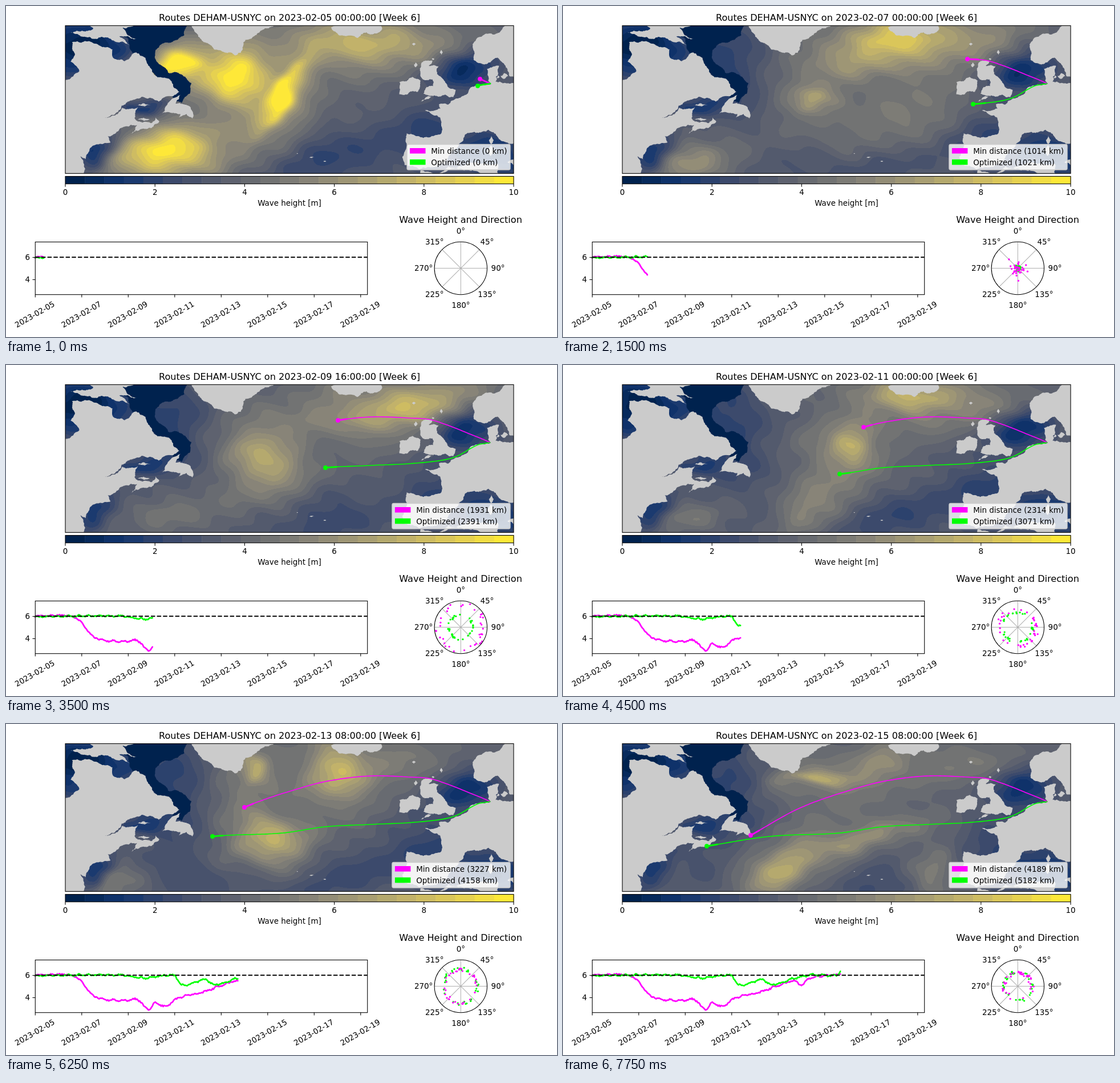
Write an HTML page with a canvas that moves like this. It is 966x580 px and loops after 8 s.

```html
<!DOCTYPE html>
<html lang="en">
<head>
<meta charset="utf-8">
<title>Routes</title>
<style>
html, body { margin: 0; width: 100%; height: 100%; overflow: hidden; background: #fff; }
canvas, svg { position: absolute; display: block; }
canvas { left: 104px; top: 34px; }
svg { left: 0; top: 0; font-family: "DejaVu Sans", sans-serif; font-size: 13.42px; }
</style>
</head>
<body>
<canvas id="sea" width="786" height="259"></canvas>
<svg id="stage" width="966" height="580" viewBox="0 0 966 580"></svg>
<script>
const start = performance.now();
const MAP = { x: 104, y: 34, w: 786, h: 259 };
const PINK = '#ff00ff', LIME = '#00ff00', LAND = '#cbcbcb';
const svg = document.getElementById('stage');

function add(tag, attrs, parent = svg, text) {
  const el = document.createElementNS('http://www.w3.org/2000/svg', tag);
  for (const k in attrs) el.setAttribute(k, attrs[k]);
  if (text !== undefined) el.textContent = text;
  parent.appendChild(el);
  return el;
}
const label = (x, y, s, anchor = 'middle', more = {}) =>
  add('text', { x, y, 'text-anchor': anchor, ...more }, svg, s);
const line = (x1, y1, x2, y2, stroke = '#000', more = {}) =>
  add('line', { x1, y1, x2, y2, stroke, 'stroke-width': 1.07, ...more });
const frame = (x, y, width, height) =>
  add('rect', { x, y, width, height, fill: 'none', stroke: '#000', 'stroke-width': 1.07 });
const curveLine = (stroke, width, parent) => add('polyline', {
  fill: 'none', stroke, 'stroke-width': width, 'stroke-linejoin': 'round', 'stroke-linecap': 'round'
}, parent);

function random(seed) {
  return () => {
    seed = (seed + 0x6D2B79F5) | 0;
    let t = Math.imul(seed ^ (seed >>> 15), 1 | seed);
    t = (t + Math.imul(t ^ (t >>> 7), 61 | t)) ^ t;
    return ((t ^ (t >>> 14)) >>> 0) / 4294967296;
  };
}

// Smooth curve through rows [t, a, b, ...], reading column c
function at(rows, t, c) {
  const n = rows.length - 1;
  if (t <= rows[0][0]) return rows[0][c];
  if (t >= rows[n][0]) return rows[n][c];
  let i = 0;
  while (rows[i + 1][0] < t) i++;
  const slope = k => {
    const a = rows[Math.max(k - 1, 0)], b = rows[Math.min(k + 1, n)];
    return (b[c] - a[c]) / (b[0] - a[0]);
  };
  const p = rows[i], q = rows[i + 1], d = q[0] - p[0], s = (t - p[0]) / d;
  const s2 = s * s, s3 = s2 * s;
  return p[c] * (2 * s3 - 3 * s2 + 1) + q[c] * (3 * s2 - 2 * s3) +
    d * (slope(i) * (s3 - 2 * s2 + s) + slope(i + 1) * (s3 - s2));
}

// ---- colours ----
const BANDS = 23;
const cividis = ['00224e', '123570', '3b496c', '575d6d', '707173', '8a8678', 'a59c74', 'c3b369', 'e1cc55', 'fee838']
  .map(h => [0, 2, 4].map(i => parseInt(h.slice(i, i + 2), 16)));
const palette = Array.from({ length: BANDS }, (_, i) => {
  const p = i / (BANDS - 1) * 9, k = Math.min(8, Math.floor(p));
  return cividis[k].map((v, c) => Math.round(v + (cividis[k + 1][c] - v) * (p - k)));
});

// ---- waves: areas are [x, y, rx, ry, degrees, height] ----
const BASE = 3.5;
const climate = [[290, 130, 70, 110, 0, 1.9], [310, 255, 110, 45, 0, 2.6], [700, 70, 120, 45, 0, 4.8],
  [560, 270, 170, 42, -14, 2.1], [750, 225, 70, 60, 0, 1.9]];
const sheltered = [[130, 70, 90, 50, 0, 0], [160, 258, 48, 20, -45, 1.4], [805, 114, 58, 36, 0, .9],
  [855, 262, 65, 36, 0, .7], [235, 175, 45, 14, 0, 1.5]];
// storms by the hour of their peak
const storms = Object.entries({
  0: [[300, 102, 50, 24, 0, 10.6], [405, 125, 52, 42, 25, 10.2], [485, 152, 72, 17, -57, 10.6],
    [620, 66, 120, 30, 0, 7.6], [285, 255, 82, 36, -8, 9.9]],
  48: [[580, 60, 95, 30, -10, 8.7], [440, 165, 36, 18, -20, 7], [590, 190, 110, 40, -20, 4.9], [225, 272, 45, 24, -10, 6]],
  80: [[535, 98, 110, 22, 0, 9.4], [745, 62, 115, 26, -20, 9.9], [322, 250, 60, 35, -20, 6.6], [650, 225, 60, 35, -20, 5]],
  112: [[450, 168, 48, 45, 15, 7.2], [705, 75, 85, 26, -5, 7.9], [280, 262, 50, 20, 0, 4.7]],
  144: [[507, 140, 30, 34, 0, 7.6], [610, 55, 75, 22, 0, 7.5], [445, 235, 75, 30, -45, 5.6], [220, 265, 50, 18, 0, 4.7]],
  200: [[580, 85, 45, 42, 0, 7.8], [460, 200, 55, 34, 15, 7.5], [432, 85, 22, 26, 10, 7.2], [175, 272, 42, 18, -15, 5.4]],
  248: [[450, 95, 60, 10, 3, 7.3], [545, 75, 55, 25, -20, 6], [390, 250, 65, 28, -30, 7.4],
    [500, 205, 110, 18, -16, 6], [650, 258, 30, 40, 20, 5]]
}).flatMap(([peak, list]) => list.map(area => ({ peak: +peak, area })));

const CELL = 3, GW = 264, GH = 89, LIFE = 24;
const sea = new Float32Array(GW * GH);

// Draws the field towards an area's height
function pull([cx, cy, rx, ry, deg, height], weight = 1) {
  const a = deg * Math.PI / 180, c = Math.cos(a), s = Math.sin(a);
  for (let j = 0, p = 0; j < GH; j++)
    for (let i = 0; i < GW; i++, p++) {
      const x = MAP.x + i * CELL, y = MAP.y + j * CELL;
      const dx = x - cx + 6 * Math.sin(y / 17) + 4 * Math.sin((x + y) / 12);
      const dy = y - cy + 4 * Math.sin(x / 21) + 3 * Math.sin((x - 2 * y) / 15);
      const d = ((dx * c + dy * s) / rx) ** 2 + ((dy * c - dx * s) / ry) ** 2;
      if (d < 7) sea[p] += (height - sea[p]) * weight * Math.exp(-d);
    }
}
function fillSea(h) {
  sea.fill(BASE);
  climate.forEach(a => pull(a));
  const live = storms.map(({ peak, area: [x, y, ...rest] }) => {
    const age = h - peak;
    return { area: [x + age * .6, y - age * .15, ...rest], weight: Math.exp(-((age / LIFE) ** 2)) };
  }).filter(s => s.weight > .02);
  for (const { area: [x, y, rx, ry, deg, v], weight } of live)
    pull([x, y, rx + 40, ry + 35, deg, (v + BASE) / 2], weight * .8);
  live.forEach(s => pull(s.area, s.weight));
  sheltered.forEach(a => pull(a));
  for (let p = 0; p < sea.length; p++) {
    const x = p % GW * CELL, y = Math.floor(p / GW) * CELL;
    sea[p] += .2 * Math.sin(x / 19 + h / 20) * Math.sin(y / 12 - x / 40 + h / 30);
  }
}

const ctx = document.getElementById('sea').getContext('2d');
const pixels = ctx.createImageData(MAP.w, MAP.h);
function drawSea(h) {
  fillSea(h);
  for (let y = 0, o = 0; y < MAP.h; y++)
    for (let x = 0; x < MAP.w; x++, o += 4) {
      const i = x / CELL | 0, j = y / CELL | 0, s = x / CELL - i, t = y / CELL - j, p = j * GW + i;
      const v = (sea[p] * (1 - s) + sea[p + 1] * s) * (1 - t) + (sea[p + GW] * (1 - s) + sea[p + GW + 1] * s) * t;
      const band = Math.max(0, Math.min(BANDS - 1, Math.floor(v * BANDS / 10)));
      pixels.data.set(palette[band], o);
      pixels.data[o + 3] = 255;
    }
  ctx.putImageData(pixels, 0, 0);
}

// ---- land: key points as longitude and latitude, roughened into coasts ----
const canada = [-82, 54.8, -79, 54.7, -76.5, 56.5, -78.3, 58.5, -77.4, 60, -78, 62.5, -73.7, 62.4, -69.6, 61,
  -69.5, 59.3, -67, 58.6, -64.7, 60.4, -61.8, 57.2, -60.2, 55.2, -57.3, 54.4, -55.7, 52.2, -60, 50.2, -66.4, 50.2, -71.2, 46.8];
const states = [-67.5, 48.9, -64.3, 49, -65, 46.7, -61.5, 45.7, -60.6, 47, -59.9, 46, -63.5, 44.5, -65.8, 43.5,
  -64.5, 45.3, -67, 45, -70.6, 43, -70, 41.7, -74, 40.7, -75.2, 38.2, -76.3, 38.8, -75.6, 35.3, -82, 34];
const europe = [16, 54.2, 10, 54.3, 10.7, 57.6, 8.2, 57, 8.8, 53.8, 5, 53.2, 3.5, 51.5, 1.7, 50.8, .2, 49.6,
  -1.8, 49.6, -1.5, 48.7, -4.7, 48.4, -1.5, 46.8, -1.5, 43.4, -8.5, 43.6, -9.4, 38.7, -8.9, 37, -5.8, 36.1,
  -2.2, 36.75, .2, 38.8, 3.2, 42, 3.7, 43.4, 8.5, 44.3, 12.3, 41.7, 16, 40.5];
const norway = [16, 67, 13, 67, 11, 64.8, 5.2, 62.1, 5.4, 58.9, 7.2, 58, 10.4, 59.3, 12.8, 55.5, 16, 55.3];
const greenland = [-54, 67, -52, 64.2, -48.5, 61, -44, 59.8, -42.9, 60.4, -42, 63, -36, 66, -36, 67];
const baffin = [-75, 67, -73.6, 65.4, -78.3, 64.5, -72, 63.6, -66, 61.9, -68.5, 63.7, -64.7, 63.2, -67.5, 65.5, -61.5, 67];
const iceland = [-22.5, 67, -24.2, 65.6, -22.3, 63.9, -18.8, 63.4, -14.5, 64.4, -13.6, 65.2, -16, 67];
const ireland = [-6.2, 52.2, -10, 51.7, -10, 54.2, -8.5, 54.4, -7.3, 55.3, -5.6, 54.5];
const britain = [-5.6, 50.1, 1.2, 51.1, 1.7, 52.6, .1, 53.2, -2.2, 55.9, -1.9, 57.5, -3.9, 57.6, -3.1, 58.6,
  -5, 58.6, -5.6, 55.4, -4.9, 54.7, -3.2, 54.8, -3, 53.4, -4.4, 53.2, -5, 51.8, -3, 51.4];
const newfoundland = [-59.3, 47.7, -57.3, 50.7, -55.5, 51.6, -56.5, 49.8, -53.6, 49.2, -53, 46.7, -54.2, 47.6, -55.8, 46.9, -55.5, 47.6];
const africa = [-6.2, 34, -5.6, 35.9, -2, 35.1, 3, 36.8, 10.5, 37.2, 11, 34];
// [lon, lat, half width, half height]
const isles = [[-63, 49.5, 1.3, .3], [-63.1, 46.5, 1.2, .3], [9.1, 42.2, .5, .9], [9, 40, .7, 1.1], [13.7, 37.6, 1.4, .6],
  [11.8, 55.5, .8, .6], [10.4, 55.3, .4, .3], [-7, 62.1, .4, .3], [-1.3, 60.4, .3, .5], [-3, 59, .3, .2], [-6.6, 57.8, .4, .5],
  [-31.2, 39.4, .15, .1], [-28.2, 38.6, .5, .12], [-25.5, 37.8, .3, .1]];

const rnd = random(7);
const pairs = l => Array.from({ length: l.length / 2 }, (_, i) => [l[2 * i], l[2 * i + 1]]);
const project = ([lon, lat]) => [MAP.x + 8.44 * (lon + 79.4), MAP.y + 8.44 * (66 - lat)];
function rough(a, b, out) {
  const dx = b[0] - a[0], dy = b[1] - a[1];
  if (Math.hypot(dx, dy) < 2.5) return out.push(b);
  const k = (rnd() - .5) * .32, m = [(a[0] + b[0]) / 2 - dy * k, (a[1] + b[1]) / 2 + dx * k];
  rough(a, m, out);
  rough(m, b, out);
}
function coast(pts) {
  const out = [];
  pts.forEach((p, i) => rough(p, pts[(i + 1) % pts.length], out));
  return 'M' + out.map(p => p.map(v => v.toFixed(1)).join(' ')).join('L') + 'Z';
}

const clip = add('clipPath', { id: 'map' }, add('defs', {}));
add('rect', MAP_RECT(), clip);
function MAP_RECT() { return { x: MAP.x, y: MAP.y, width: MAP.w, height: MAP.h }; }
const map = add('g', { 'clip-path': 'url(#map)' });
const ice = [190, 30, 322, 30, 312, 52, 262, 77, 267, 100, 284, 117, 325, 135, 322, 154, 308, 170, 230, 90];
add('path', { d: coast(pairs(ice)), fill: '#00224e' }, map);
const lands = [[...canada, ...states], europe, norway, greenland, baffin, iceland, ireland, britain, newfoundland, africa]
  .map(pairs)
  .concat(isles.map(([x, y, w, h]) => [[x - w, y], [x, y + h], [x + w, y], [x, y - h]]));
add('path', { d: lands.map(l => coast(l.map(project))).join(''), fill: LAND }, map);

// ---- routes: [hours, x, y, km] ----
const pinkRoute = [[-8, 849, 136, 0], [0, 831, 128, 0], [32, 749, 97, 670], [48, 709, 93, 1014], [80, 641, 91, 1503],
  [112, 582, 97, 1931], [144, 527, 109, 2314], [200, 418, 146, 3227], [248, 329, 195, 4189]];
const limeRoute = [[-8, 849, 136, 0], [0, 827, 140, 0], [24, 782, 163, 510], [48, 719, 172, 1021], [80, 639, 176, 1705],
  [112, 560, 180, 2391], [144, 485, 191, 3071], [200, 362, 197, 4158], [248, 252, 214, 5182]];
function route(rows, color) {
  const thin = curveLine(color, 1.6, map), thick = curveLine(color, 2.8, map);
  const dot = add('circle', { r: 3.9, fill: color }, map);
  const pts = Array.from({ length: 129 }, (_, i) => [1, 2].map(c => at(rows, i * 2 - 8, c).toFixed(1)));
  return h => {
    const n = h / 2 + 4;
    thin.setAttribute('points', pts.slice(0, n + 1).join(' '));
    thick.setAttribute('points', pts.slice(n - 4, n + 1).join(' '));
    dot.setAttribute('cx', pts[n][0]);
    dot.setAttribute('cy', pts[n][1]);
  };
}
const parts = [drawSea, route(pinkRoute, PINK), route(limeRoute, LIME)];
frame(MAP.x, MAP.y + .4, MAP.w, MAP.h);

// ---- legend ----
const box = add('rect', { y: 242.5, height: 44.5, rx: 2.7, fill: '#fff', 'fill-opacity': .8, stroke: '#ccc', 'stroke-width': 1.3 });
const entries = [[PINK, 249, 'Min distance', pinkRoute], [LIME, 268.8, 'Optimized', limeRoute]].map(([fill, y, name, rows]) => ({
  name, rows, patch: add('rect', { y, width: 27.5, height: 9.5, fill }), text: label(0, y + 9.7, '', 'start')
}));
function drawLegend(h) {
  const km = entries.map(e => Math.round(at(e.rows, h, 3)));
  const left = 703 - 8.7 * (String(km[0]).length - 1);
  box.setAttribute('x', left);
  box.setAttribute('width', 884 - left);
  entries.forEach((e, i) => {
    e.patch.setAttribute('x', left + 5);
    e.text.setAttribute('x', left + 42.3);
    e.text.textContent = `${e.name} (${km[i]} km)`;
  });
}

// ---- titles and colour bar ----
const title = label(497, 26.3, '', 'middle', { 'font-size': 16.1 });
label(797, 379.6, 'Wave Height and Direction', 'middle', { 'font-size': 16.1 });
const band = MAP.w / BANDS;
palette.forEach((c, i) => add('rect', { x: MAP.x + i * band, y: 298.5, width: band + .5, height: 13.2, fill: `rgb(${c})` }));
frame(MAP.x, 298.5, MAP.w, 13.2);
for (let v = 0; v <= 10; v += 2) {
  const x = MAP.x + v * 78.6;
  line(x, 312, x, 316.7);
  label(x, 331.3, v);
}
label(497, 350.2, 'Wave height [m]');

// ---- speed chart: key points plus jitter ----
const pinkSpeed = [[51, 440], [122, 443], [157, 478], [214, 484], [231, 483], [249, 500], [262, 489], [280, 495],
  [300, 481], [345, 470], [404, 450], [420, 457], [430, 446], [487, 438]];
const limeSpeed = [[51, 441], [201, 440], [243, 445], [295, 441], [310, 458], [348, 448], [367, 457], [404, 446], [432, 440], [480, 440], [487, 433]];
function series(rows, color, seed) {
  const r = random(seed), el = curveLine(color, 2.7);
  const pts = Array.from({ length: 257 }, (_, i) => {
    const x = 51 + i * 1.7;
    return [x.toFixed(1), (at(rows, x, 1) + (r() - .5) * 2.6 + Math.sin(x / 2.9 + seed)).toFixed(1)];
  });
  return h => el.setAttribute('points', pts.slice(0, h + 10).join(' '));
}
parts.push(series(pinkSpeed, PINK, 3), series(limeSpeed, LIME, 11));
line(51.3, 440.2, 633.7, 440.2, '#000', { 'stroke-width': 2, 'stroke-dasharray': '7.446 3.22' });
frame(51.3, 413.5, 582.4, 92.2);
for (const v of [6, 4]) {
  const y = 557.5 - v * 19.5;
  line(46.5, y, 51, y);
  label(42, y + 4.9, v, 'end');
}
for (let i = 0; i < 8; i++) {
  const x = 51.3 + i * 81.5, day = String(5 + 2 * i).padStart(2, '0');
  line(x, 505.7, x, 510.4);
  label(0, 4.9, '2023-02-' + day, 'middle', { transform: `translate(${x - 1} 540.3) rotate(-30)` });
}

// ---- polar plot ----
const CX = 797.3, CY = 459.5, R = 46.2;
const polar = (deg, rx, ry = rx) => [CX + rx * Math.sin(deg * Math.PI / 180), CY - ry * Math.cos(deg * Math.PI / 180)];
for (let a = 0; a < 180; a += 45) line(...polar(a, R), ...polar(a + 180, R), '#b0b0b0');
const dots = add('g', {});
add('circle', { cx: CX, cy: CY, r: R, fill: 'none', stroke: '#000', 'stroke-width': 1.07 });
for (let a = 0; a < 360; a += 45) {
  const [x, y] = polar(a, 65.2, 65.2);
  label(x, y + 4.7, a + '°');
}
// [hours, lime radius, spread, pink radius, spread]
const rings = [[0, 2, 1, 3, 2], [48, 3, 3, 11, 11], [80, 18, 2, 37, 8], [112, 21, 2, 40, 5], [144, 26, 2, 33, 4], [200, 30, 3, 29, 3], [248, 25, 3, 24, 4]];
const cloud = [LIME, PINK].map(fill => Array.from({ length: 36 }, () => add('circle', { r: 1.65, fill }, dots)));
function drawPolar(h) {
  dots.setAttribute('visibility', h ? 'visible' : 'hidden');
  const r = random(h + 5);
  cloud.forEach((set, k) => set.forEach(el => {
    const d = at(rings, h, 1 + 2 * k) + (2 * r() - 1) * at(rings, h, 2 + 2 * k);
    const [x, y] = polar(r() * 360, Math.max(0, Math.min(R - 1, d)));
    el.setAttribute('cx', x.toFixed(1));
    el.setAttribute('cy', y.toFixed(1));
  }));
}
parts.push(drawLegend, drawPolar);

// ---- clock: one step is 250 ms and eight hours ----
let shown = -1;
function draw(ms) {
  const step = Math.floor((ms % 8000) / 250);
  if (step === shown) return;
  shown = step;
  const h = step * 8, pad = n => String(n).padStart(2, '0');
  title.textContent = `Routes DEHAM-USNYC on 2023-02-${pad(5 + Math.floor(h / 24))} ${pad(h % 24)}:00:00 [Week 6]`;
  parts.forEach(part => part(h));
}
function tick() {
  draw(performance.now() - start);
  requestAnimationFrame(tick);
}
draw(0);
requestAnimationFrame(tick);
</script>
</body>
</html>
```
